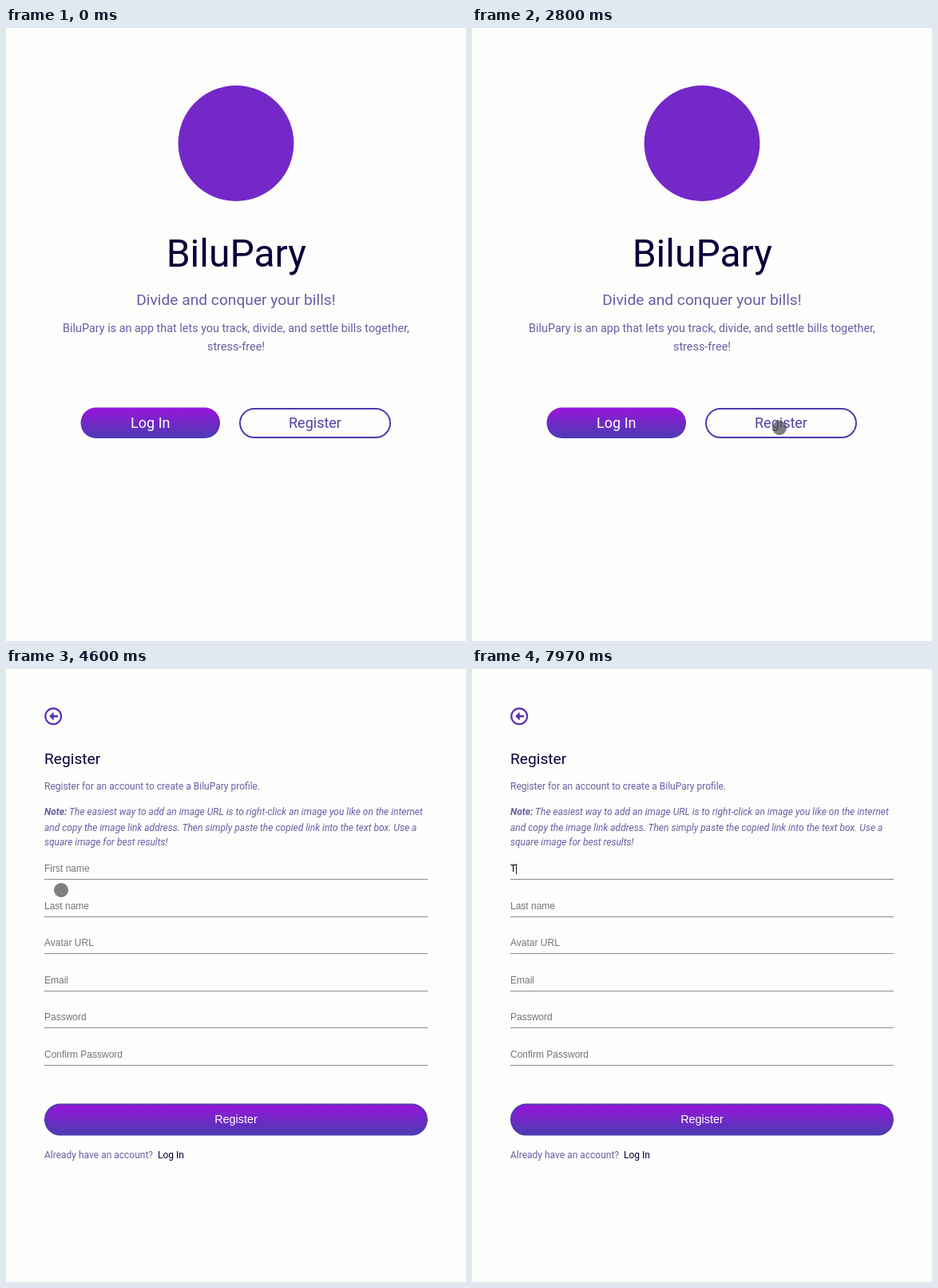
Write an HTML page that moves like this. It is 576x768 px and loops after 8 s.

```html
<!DOCTYPE html>
<html lang="en">
<head>
<meta charset="utf-8">
<title>Bill splitting sign-up</title>
<style>
  html, body { margin: 0; width: 100%; height: 100%; overflow: hidden; background: #fdfdfb; }
  svg { display: block; width: 100vw; height: 100vh; }
  text { font-family: Roboto, sans-serif; fill: #6a5da6; white-space: pre; }
  .mid { text-anchor: middle; }
  .dark { fill: #080038; }
  .white { fill: #fff; }
  .small { font-size: 12px; }
  .note { font-style: italic; }
  .field, .field text { font-family: "Liberation Sans", Arial, sans-serif; font-size: 12px; }
  .hint { fill: #757575; }
</style>
</head>
<body>
<svg viewBox="0 0 576 768">
  <defs>
    <linearGradient id="fade" x1="0" y1="0" x2="0" y2="1">
      <stop offset="0" stop-color="#9a14dc"/>
      <stop offset="1" stop-color="#4a3cb2"/>
    </linearGradient>
  </defs>
  <rect width="576" height="768" fill="#fdfdfb"/>

  <g id="home">
    <circle cx="288" cy="144.5" r="72.4" fill="#7428c8"/>
    <text class="mid dark" x="288.3" y="299" font-size="48">BiluPary</text>
    <text class="mid" x="288" y="347" font-size="19.2">Divide and conquer your bills!</text>
    <g class="mid" font-size="14.4">
      <text x="288" y="381">BiluPary is an app that lets you track, divide, and settle bills together,</text>
      <text x="288" y="403.5">stress-free!</text>
    </g>
    <rect x="93.5" y="475.5" width="174.5" height="38.5" rx="19.2" fill="url(#fade)"/>
    <rect x="293" y="477" width="188" height="36" rx="18" fill="none" stroke="#4f3bb0" stroke-width="2"/>
    <text class="mid white" x="180.8" y="501" font-size="18">Log In</text>
    <text class="mid" x="387" y="501" font-size="18" style="fill:#553fa8">Register</text>
  </g>

  <g id="form">
    <g fill="none" stroke="#5a2fb4">
      <circle cx="59.2" cy="59.2" r="9.9" stroke-width="2.2"/>
      <path d="M65 59.2H57" stroke-width="2.6"/>
      <path d="M59.3 54.6L54.6 59.2L59.3 63.8Z" fill="#5a2fb4" stroke-width=".8"/>
    </g>
    <text class="dark" x="48" y="119" font-size="19.2">Register</text>
    <text class="small" x="48" y="151">Register for an account to create a BiluPary profile.</text>
    <g class="small note">
      <text x="48" y="183"><tspan font-weight="700">Note:</tspan> The easiest way to add an image URL is to right-click an image you like on the internet</text>
      <text x="48" y="203">and copy the image link address. Then simply paste the copied link into the text box. Use a</text>
      <text x="48" y="221">square image for best results!</text>
    </g>
    <g id="fields" class="field"></g>
    <text id="typed" class="field" x="48" y="254" style="fill:#000">T</text>
    <rect id="caret" y="244" width="1" height="13" fill="#222"/>
    <rect x="49" y="545.5" width="478" height="38" rx="19" fill="url(#fade)" stroke="#4f3bb0" stroke-width="2"/>
    <text class="field mid" x="288" y="569" style="font-size:14.4px;fill:#fff">Register</text>
    <text class="small" x="48" y="613">Already have an account?</text>
    <text class="small dark" x="190" y="613">Log In</text>
  </g>

  <circle id="touch" r="9" fill="#484850" fill-opacity=".7"/>
</svg>
<script>
const LOOP = 8000, SWITCH = 3100, FOCUS = 7000, TYPE = 7620, ENTER = 1450;
const $ = id => document.getElementById(id);
const show = (el, on) => el.setAttribute("visibility", on ? "visible" : "hidden");

const labels = ["First name", "Last name", "Avatar URL", "Email", "Password", "Confirm Password"];
$("fields").innerHTML = labels.map((label, i) => {
  const y = Math.round(254 + i * 46.55);
  return `<text class="hint" x="48" y="${y}">${label}</text>
    <rect x="48" y="${y + 9}" width="480" height="1" fill="#8c8c8c"/>`;
}).join("");
const firstHint = $("fields").querySelector("text");

// pointer stops: time, x, y
const path = [
  [ENTER, 566, 760], [1720, 525, 514], [2200, 385, 501], [3000, 385, 501],
  [3640, 369, 461], [4600, 69, 277], [5400, -3, 261], [6250, -3, 261],
  [6800, 78, 253], [LOOP, 78, 253]
];

function pointer(t) {
  const i = Math.max(1, path.findIndex(p => p[0] > t));
  const [t0, x0, y0] = path[i - 1], [t1, x1, y1] = path[i];
  const u = Math.min(1, Math.max(0, (t - t0) / (t1 - t0)));
  const e = u * u * (3 - 2 * u);
  return [x0 + (x1 - x0) * e, y0 + (y1 - y0) * e];
}

function draw(t) {
  const onForm = t >= SWITCH, typed = t >= TYPE;
  show($("home"), !onForm);
  $("form").style.display = onForm ? "" : "none";
  show(firstHint, !typed);
  show($("typed"), typed);
  show($("caret"), typed || (t >= FOCUS && (t - FOCUS) % 1000 < 500));
  $("caret").setAttribute("x", typed ? 55 : 48);
  const [x, y] = pointer(t);
  $("touch").setAttribute("cx", x);
  $("touch").setAttribute("cy", y);
  show($("touch"), t >= ENTER && !typed);
}

const start = performance.now();
function tick() {
  draw((performance.now() - start) % LOOP);
  requestAnimationFrame(tick);
}
tick();
</script>
</body>
</html>
```
